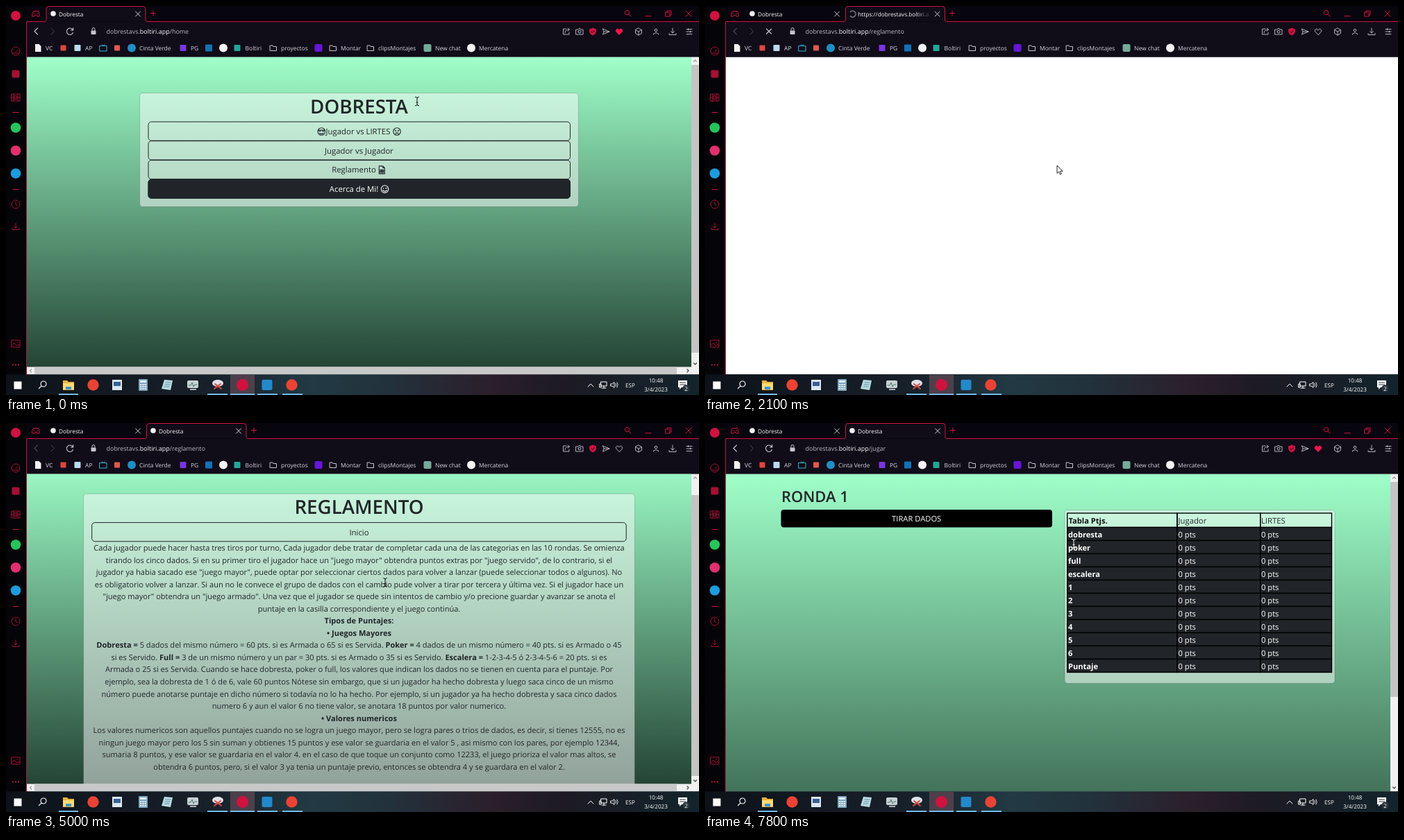
These frames come from a looping animation (998x561 px, 8000 ms). An HTML page:

```html
<!DOCTYPE html>
<html lang="es">
<head>
<meta charset="utf-8">
<style>
html, body { margin: 0; width: 100%; height: 100%; overflow: hidden; background: #07060c; }
svg { display: block; width: 998px; height: 561px; }
text { font-family: "Open Sans", "Noto Sans", sans-serif; text-rendering: geometricPrecision; white-space: pre; }
.ln { fill: none; stroke: currentColor; stroke-linecap: round; stroke-linejoin: round; }
</style>
</head>
<body>
<svg id="stage" viewBox="0 0 998 561" xmlns="http://www.w3.org/2000/svg"></svg>
<script>
const INK = '#212529', RED = '#d0123f', PALE = '#c8c5d0';

// Markup helpers
const text = (x, y, s, size, fill = '#fff', o = '') =>
  `<text x="${x}" y="${y}" font-size="${size}" fill="${fill}" ${o}>${s}</text>`;
const mid = 'text-anchor="middle"';
const rect = (x, y, w, h, fill, o = '') => `<rect x="${x}" y="${y}" width="${w}" height="${h}" fill="${fill}" ${o}/>`;
const dot = (x, y, r, fill) => `<circle cx="${x}" cy="${y}" r="${r}" fill="${fill}"/>`;
const box = (x, y, s, fill, r = 1) => rect(x - s / 2, y - s / 2, s, s, fill, `rx="${r}"`);
const line = (x, y, d, color, w = 1) =>
  `<path class="ln" transform="translate(${x} ${y})" d="${d}" style="color:${color};stroke-width:${w}"/>`;
const group = (id, s, o = '') => `<g id="${id}" ${o}>${s}</g>`;
const ring = r => `M${-r} 0a${r} ${r} 0 1 0 ${2 * r} 0a${r} ${r} 0 1 0 ${-2 * r} 0`;

const CROSS = 'M-3.5-3.5L3.5 3.5M3.5-3.5L-3.5 3.5';
const PLUS = 'M-3.5 0H3.5M0-3.5V3.5';
const LENS = ring(3.2) + 'M2.3 2.3L5.5 5.5';
const DOWN = 'M0-5V2M-2.5-.5L0 2L2.5-.5M-5 2.5V4.5H5V2.5';
const FOLDER = 'M-4.5-3.5H-1L0-2H4.5V4H-4.5Z';
const HEART = 'M0 4.5L-4.3 0C-6-2.5-2-6 0-2.2C2-6 6-2.5 4.3 0Z';

// Browser frame
function sidebar() {
  return rect(0, 0, 30, 532, '#050509') + dot(14, 14, 7, RED) +
    line(14, 65, ring(6) + 'M0 1L3-2M-4 3H4', '#a51034') + box(14, 98, 11, '#a51034', 2) +
    line(14, 132, 'M-6-5H6V5H-6ZM-3-5V5M3-5V5M-1.5-2.5H1.5V2.5H-1.5ZM-6 0H-3M3 0H6', '#a51034') +
    line(14, 153.5, 'M-4 0H4', RED) + dot(14, 175.5, 7.3, '#25c55a') + dot(14, 208.5, 7.3, '#e0306d') +
    dot(14, 241.5, 7.3, '#1d9bdc') + line(14, 264.5, 'M-4 0H4', RED) +
    line(14, 286, ring(6) + 'M0-3.5V0L2 2', '#a51034') + line(14, 318, DOWN, '#a51034') +
    line(14, 487, 'M-6-5H6V5H-6ZM-6 3L-2-1L2 3L4 1L6 3M2-2H3', '#a51034') +
    [10, 14, 18].map(x => dot(x, 517.5, 1.1, RED)).join('');
}

function bookmarks() {
  const label = (x, s) => text(x, 63.7, s, 8.5, '#d9d7df');
  const folder = (x, s) => line(x, 60.5, FOLDER, PALE) + label(x + 11, s);
  return `<path d="M42 55H47.5L50.5 58V66H42Z" fill="#f4f4f6"/>` + label(57, 'VC') +
    box(82.5, 60.5, 8, '#e2463c') + box(103, 60.5, 9, '#b9dcf2') + label(114, 'AP') +
    line(140, 61, 'M-5-3.5H5V4H-5ZM-2-5.5L0-3.5L2-5.5', '#35b6d6') + box(160, 60.5, 8, '#e2594f') +
    dot(181, 60.5, 6, '#1f8fc4') + label(192, 'Cinta Verde') + box(255, 60.5, 9, '#7a35e0') +
    label(266, 'PG') + box(292, 60.5, 10, '#1272b8') + dot(313, 60.5, 6, '#f3f3f5') +
    box(333, 60.5, 9, '#22a699') + label(344.5, 'Boltiri') + folder(385, 'proyectos') +
    box(450, 60.5, 11, '#6716d8', 2) + folder(471, 'Montar') + folder(525, 'clipsMontajes') +
    box(607, 60.5, 11, '#74aa9c', 2) + label(618, 'New chat') + dot(670, 60.5, 6, '#f3f3f5') +
    label(681, 'Mercatena');
}

function toolbar() {
  const bits = [
    [807, 'M0-4H-4.5V4H4V1M-2 2C-2-1 0-3 4-3M2-5L4.5-3L2-1'],
    [826, 'M-5-3H-2L-1-4.5H1L2-3H5V4H-5Z' + ring(2)],
    [864, 'M-4.5-4L5 0L-4.5 4L-3 0ZM-3 0H5'],
    [911, 'M0-5L4.5-2.5V2.5L0 5L-4.5 2.5V-2.5ZM-4.5-2.5L0 0L4.5-2.5M0 0V5'],
    [936, 'M-1.8-2a1.8 1.8 0 1 0 3.6 0a1.8 1.8 0 1 0-3.6 0M-3.5 4V3Q0 0 3.5 3V4'],
    [960, DOWN],
    [984, 'M-4-3.5H4M-4 0H4M-4 3.5H4M-1.5-4.5V-2.5M1.5-1V1']
  ];
  return bits.map(([x, d]) => line(x, 37, d, PALE, .9)).join('') +
    `<path transform="translate(845 37)" d="M0-5.5L5-3.5V0Q4 4 0 5.5Q-4 4-5 0V-3.5Z" fill="${RED}"/>` +
    line(845, 37, 'M-2 0L-.5 1.7L2.2-1.5', '#100c18') +
    group('heartOff', line(883, 37, HEART, PALE, .9)) +
    group('heartOn', `<path transform="translate(883 37)" d="${HEART}" fill="#f0164b" stroke="#f0164b"/>`) +
    group('back', line(43, 36.5, 'M2.5-4.5L-2 0L2.5 4.5', 'currentColor', 1.1)) +
    line(67, 36.5, 'M-2-4.5L2.5 0L-2 4.5', '#4b4753') +
    group('reload', line(92, 36.5, 'M4.5-1.5A4.7 4.7 0 1 0 4.5 2M4.7-5V-1.5H1.5', PALE, 1.1)) +
    group('stop', line(92, 36.5, CROSS, PALE, 1.1)) +
    rect(122.5, 35.5, 7, 5.5, PALE, 'rx="1"') + line(126, 35, 'M-2 .5V-1.5A2 2 0 0 1 2-1.5V.5', PALE) +
    `<text y="40" x="144.5" font-size="8.95" fill="#bbb7c4">dobrestavs.<tspan fill="#fff">boltiri.app</tspan><tspan id="path"></tspan></text>`;
}

function tabs() {
  const edge = (a, b) =>
    `<path d="M30 22.5H${a - 2}Q${a} 22.5 ${a} 20V4Q${a} .5 ${a + 4} .5H${b - 4}Q${b} .5 ${b} 4V20Q${b} 22.5 ${b + 2} 22.5H998" fill="#100c18" stroke="${RED}"/>`;
  const title = x => dot(x + 4, 11, 3.8, '#f2f2f4') + text(x + 12, 14.6, 'Dobresta', 8.25);
  const close = x => line(x, 11.5, CROSS, '#e8e6ec', .9);
  const plus = x => line(x, 10.5, PLUS, RED);
  return group('oneTab', edge(58, 201) + plus(212)) +
    group('newTab', edge(202.5, 345.5) +
      `<path id="spin" d="M4.4 0A4.4 4.4 0 1 1 0-4.4" class="ln" stroke-width="1.6" style="color:#77737f"/>` +
      text(220.5, 14.6, 'https://dobrestavs.boltiri.a', 8.25) + rect(304, 6, 22, 11, 'url(#fade)') +
      close(334.5) + plus(356)) +
    group('readyTab', edge(202.5, 346) + title(208) + close(335) + plus(357)) + title(64) + close(190);
}

function frame() {
  return rect(0, 0, 998, 74, '#07050d') + rect(30, 23, 968, 51, '#100c18') + sidebar() +
    line(43, 11.5, 'M-5-1L-3.5-4H3.5L5-1V3.5H2L1 1.5H-1L-2 3.5H-5ZM-3-.5H-2M2-.5H3', RED) +
    tabs() + rect(29, 22.5, 1.2, 509.5, '#b01038') +
    line(894.5, 9.5, LENS, RED) + line(925, 14.5, 'M-4 0H4', RED) +
    line(954, 11, 'M-4-2H2V4H-4ZM-2-2V-4H4V2H2', RED) + line(983, 11, 'M-4-4L4 4M4-4L-4 4', RED) +
    toolbar() + bookmarks();
}

function taskbar() {
  const under = [[76, 28], [290, 29], [362, 29], [398, 29]];
  return rect(0, 531.5, 998, 30, 'url(#bar)') + rect(323, 532, 35, 29, '#5a4652', 'opacity=".8"') +
    under.map(([x, w]) => rect(x, 559, w, 2, '#6fb7ec')).join('') + rect(323, 559, 35, 2, '#6fb7ec') +
    box(17, 547, 11, '#fff', 0) + line(54, 545, 'M-4 0a4 4 0 1 0 8 0a4 4 0 1 0-8 0M-2.8 2.8L-6.5 6.5', '#f2f2f2', 1.2) +
    `<path d="M82 540H88L90 542H98V554H82Z" fill="#e7b33d"/>` + rect(82, 544, 16, 9, '#ffda72') + rect(86, 549, 8, 4, '#3d94d8') +
    dot(125.5, 546.5, 8.2, '#ea4335') + rect(153, 539, 14, 15, '#dbe7f2') + rect(155, 542, 10, 6, '#395f94') +
    rect(191, 538, 13, 17, '#7ba6bf', 'rx="1"') + rect(193, 540, 9, 3, '#e6f4fa') +
    [0, 1, 2].map(r => [0, 1, 2].map(c => rect(193 + c * 3.3, 545 + r * 3, 2.3, 2, '#e9eef2')).join('')).join('') +
    `<path d="M228 539L240 540L237 554L224 552Z" fill="#b9dbe2"/>` + line(232, 546, 'M-2-3H5M-3 0H4M-4 3H3', '#5f929e') +
    rect(261, 540, 16, 11, '#c9d2d6', 'rx="2"') + line(269, 546, 'M-6 1H-3L-1-3L1 3L3 0H6', '#427567') + rect(265, 552, 9, 2, '#aab4b8') +
    `<ellipse cx="305" cy="544" rx="8" ry="5" fill="#dfe1e8"/>` + line(305, 548, 'M-5 4L4-3M5 4L-4-3', '#d3483f', 2) +
    dot(340.5, 546.5, 8.5, RED) + box(376, 546.5, 15, '#2489ca', 2) + dot(411.5, 546.5, 8.2, '#ea4335') +
    line(842, 547, 'M-4 2L0-2L4 2', '#fff') + line(860, 546, 'M-3-4H5V2H-3ZM1 2V5M-2 5H4M-5-1H-3V4H-5Z', '#fff') +
    line(876, 546.5, 'M-5-1.5H-3L0-4V4L-3 1.5H-5ZM2-2Q3.5 0 2 2M4-3.5Q6.5 0 4 3.5', '#fff', .9) +
    text(892, 549.6, 'ESP', 8.1) + text(936, 542.6, '10:48', 8.1, '#fff', mid) + text(936, 555.6, '3/4/2023', 8.1, '#fff', mid) +
    `<path d="M968 540H981V550H973L970 553V550H968Z" fill="#fff"/>` + line(974.5, 545, 'M-4-2H4M-4 1H4', '#333') +
    dot(979.5, 551.5, 5.2, '#29343c') + text(979.5, 554.6, '2', 8, '#fff', mid);
}

// Pages
const FACE = ring(5.3);
const glyphs = {
  cool: FACE + 'M-4.8-2H4.8M-4-1.8Q-2.5 1.5-.7-1.8M4-1.8Q2.5 1.5 .7-1.8M-2.5 2.5Q0 4.2 2.5 2.5',
  angry: FACE + 'M-3-2L-1.2-1M3-2L1.2-1M-1.8 0V.2M1.8 0V.2M-2 3Q0 1.2 2 3',
  sheet: 'M-4-5.5H1.5L4-3V5.5H-4ZM1.5-5.5V-3H4M-2.5 0H2.5V3.5H-2.5ZM-2.5 1.7H2.5M0 0V3.5',
  wink: FACE + 'M-2-1.5V-1M1-1.2Q2-2 3-1.2M-2.8 1.5Q0 4.8 2.8 1.5'
};

const card = (x, y, w, h) => rect(x, y, w, h, '#fff', 'fill-opacity=".5" stroke="#000" stroke-opacity=".175" rx="4.4"');

function button(id, x, y, w, label, cx, icons = []) {
  const face = c => text(cx, y + 18, label, 11.35, c, mid) +
    `<g class="icons">${icons.map(([k, ix]) => line(ix, y + 14, glyphs[k], c, 1.1)).join('')}</g>`;
  return `<rect x="${x}" y="${y}" width="${w}" height="27.2" rx="4.4" fill="none" stroke="${INK}"/>` + face(INK) +
    group(id, `<rect x="${x}" y="${y}" width="${w}" height="27.2" rx="4.4" fill="${INK}" stroke="${INK}"/>` + face('#fff'));
}

const heading = s => text(508.5, 154.5, s, 27.7, INK, mid + ' font-weight="600"');

function homePage() {
  return rect(30, 73.5, 957, 470, 'url(#mint)') + card(192.5, 125.5, 632, 164) + heading('DOBRESTA') +
    button('b1', 205, 167, 607.5, 'Jugador vs LIRTES', 507, [['cool', 454.3], ['angry', 563]]) +
    button('b2', 205, 194.7, 607.5, 'Jugador vs Jugador', 508.5) +
    button('b3', 205, 222.4, 607.5, 'Reglamento', 501, [['sheet', 541.3]]) +
    button('b4', 205, 250.1, 607.5, 'Acerca de Mi!', 501, [['wink', 545.5]]);
}

const RULES = `Cada jugador puede hacer hasta tres tiros por turno, Cada jugador debe tratar de completar cada una de las categorias en las 10 rondas. Se omienza
tirando los cinco dados. Si en su primer tiro el jugador hace un "juego mayor" obtendra puntos extras por "juego servido", de lo contrario, si el
jugador ya habia sacado ese "juego mayor", puede optar por seleccionar ciertos dados para volver a lanzar (puede seleccionar todos o algunos). No
es obligatorio volver a lanzar. Si aun no le convece el grupo de dados con el cambio pude volver a tirar por tercera y última vez. Si el jugador hace un
"juego mayor" obtendra un "juego armado". Una vez que el jugador se quede sin intentos de cambio y/o precione guardar y avanzar se anota el
puntaje en la casilla correspondiente y el juego continúa.
*Tipos de Puntajes:*
*• Juegos Mayores*
*Dobresta =* 5 dados del mismo número = 60 pts. si es Armada o 65 si es Servida. *Poker =* 4 dados de un mismo número = 40 pts. si es Armado o 45
si es Servido. *Full =* 3 de un mismo número y un par = 30 pts. si es Armado o 35 si es Servido. *Escalera =* 1-2-3-4-5 ó 2-3-4-5-6 = 20 pts. si es
Armada o 25 si es Servida. Cuando se hace dobresta, poker o full, los valores que indican los dados no se tienen en cuenta para el puntaje. Por
ejemplo, sea la dobresta de 1 ó de 6, vale 60 puntos Nótese sin embargo, que si un jugador ha hecho dobresta y luego saca cinco de un mismo
número puede anotarse puntaje en dicho número si todavía no lo ha hecho. Por ejemplo, si un jugador ya ha hecho dobresta y saca cinco dados
numero 6 y aun el valor 6 no tiene valor, se anotara 18 puntos por valor numerico.
*• Valores numericos*
Los valores numericos son aquellos puntajes cuando no se logra un juego mayor, pero se logra pares o trios de dados, es decir, si tienes 12555, no es
ningun juego mayor pero los 5 sin suman y obtienes 15 puntos y ese valor se guardaria en el valor 5 , asi mismo con los pares, por ejemplo 12344,
sumaria 8 puntos, y ese valor se guardaria en el valor 4. en el caso de que toque un conjunto como 12233, el juego prioriza el valor mas altos, se
obtendra 6 puntos, pero, si el valor 3 ya tenia un puntaje previo, entonces se obtendra 4 y se guardara en el valor 2.`;

function rulesPage() {
  const bold = s => s.replace(/\*(.+?)\*/g, '<tspan font-weight="700">$1</tspan>');
  return rect(30, 73.5, 957, 495, 'url(#mint)') + card(111.5, 125.5, 794, 425) + heading('REGLAMENTO') +
    button('inicio', 123.7, 167, 769.5, 'Inicio', 508.5) +
    RULES.split('\n').map((s, i) => text(508.5, 207.4 + i * 17.55, bold(s), 11.05, INK, mid)).join('');
}

function gamePage() {
  const rows = ['dobresta', 'poker', 'full', 'escalera', 1, 2, 3, 4, 5, 6, 'Puntaje'];
  const cells = (y, h, fill) => [[521.7, 158.3], [680, 119.7], [799.7, 102.8]]
    .map(([x, w]) => rect(x, y, w, h, fill, 'stroke="#000" stroke-width="1.4"')).join('');
  const B = 'font-weight="700"';
  return rect(30, 73.5, 957, 643, 'url(#mint)') + text(110, 113.7, 'RONDA 1', 21.9, INK, 'font-weight="600"') +
    rect(109.5, 125, 390.5, 25.5, '#000', 'rx="4"') + text(304.7, 142, 'TIRAR DADOS', 11.2, '#fff', mid) +
    card(518, 125.5, 389, 250) + cells(130, 20.5, 'none') +
    text(523.5, 145, 'Tabla Ptjs.', 11.1, '#111', B) + text(681.5, 145, 'Jugador', 11.3, INK) + text(801, 145, 'LIRTES', 11.3, INK) +
    rows.map((r, i) => {
      const y = 150.5 + i * 19;
      return cells(y, 19, INK) + text(523, y + 14, r, 11.1, '#fff', B) +
        text(681.5, y + 14, '0 pts', 11.2) + text(801, y + 14, '0 pts', 11.2);
    }).join('');
}

function scrollbars() {
  const tri = (x, y, d, c) => line(x, y, d, c, 1.2);
  return group('bars', rect(987, 73.5, 11, 458, '#f1f1f1') + group('thumb', rect(987, 85, 11, 1, '#c4c4c4', 'id="grip"')) +
    tri(992.5, 79, 'M-2 1L0-1L2 1', '#999') + group('downArrow', tri(992.5, 516, 'M-2-1L0 1L2-1', '#444')) +
    group('hbar', rect(30, 520.5, 957, 11, '#f1f1f1') + rect(41, 520.5, 925, 11, '#c8c8c8') +
      tri(35.5, 526, 'M1-2L-1 0L1 2', '#999') + tri(982, 526, 'M-1-2L1 0L-1 2', '#444')));
}

const pointers = {
  beam: '<path class="ln" d="M-2.5-6.3Q0-6.3 0-4.8V4.8Q0 6.3-2.5 6.3M2.5-6.3Q0-6.3 0-4.8M0 4.8Q0 6.3 2.5 6.3M-1 1.5H1"/>',
  arrow: '<path d="M0 0V11.3L2.6 8.9L4.4 13L6.3 12.1L4.5 8.2H8Z" fill="#fff" stroke="#111" stroke-width=".9"/>',
  hand: '<path d="M-1.2 1Q0-1 1.2 1V6L2.6 5.4L4 6.4L5.4 6.2L7 7.6V11.5L5.6 15.7H-.6L-4 10.2Q-4.3 8.4-2.6 9L-1.2 10.5Z" fill="#fff" stroke="#111" stroke-width=".9"/>'
};

document.getElementById('stage').innerHTML = `<defs>
  <linearGradient id="mint" x2="0" y2="1"><stop stop-color="#9fffc9"/><stop offset="1" stop-color="#1e3b2e"/></linearGradient>
  <linearGradient id="fade"><stop stop-color="#100c18" stop-opacity="0"/><stop offset="1" stop-color="#100c18"/></linearGradient>
  <linearGradient id="bar"><stop stop-color="#0d1219"/><stop offset=".3" stop-color="#18202a"/><stop offset=".44" stop-color="#223a44"/>
    <stop offset=".55" stop-color="#22323c"/><stop offset=".7" stop-color="#2b1f2b"/><stop offset=".8" stop-color="#1d1a23"/><stop offset="1" stop-color="#12242c"/></linearGradient>
  <clipPath id="view"><path d="M30 73.5H998V531.5H30Z"/></clipPath></defs>` +
  frame() + `<g clip-path="url(#view)">` + rect(30, 73.5, 968, 458, '#fff') + group('home', homePage()) +
  group('rules', rulesPage()) + group('game', gamePage()) + scrollbars() +
  group('hint', rect(30.5, 512, 185.5, 20, '#fbfbfb', 'stroke="#aaa"') +
    text(36, 526, 'https://dobrestavs.boltiri.app/reglamento', 8.95, '#555')) + '</g>' + taskbar() +
  group('pointer', Object.entries(pointers).map(([k, s]) => group(k, s)).join(''));

// Motion
const MOVES = [
  [0, 592, 137.5, 'beam'], [200, 589, 150, 'beam'], [300, 583, 170, 'hand'], [500, 566, 192, 'hand'],
  [700, 538, 212, 'hand'], [900, 513, 228, 'hand'], [1100, 507, 238, 'hand'], [1400, 507, 238, 'arrow'],
  [1700, 507, 238, 'arrow'], [2100, 507, 230, 'arrow'], [2300, 507, 230, 'arrow'], [2400, 507, 222, 'arrow'],
  [2600, 509, 222, 'beam'], [3300, 509, 222, 'beam'], [4300, 536, 228, 'beam'], [5000, 546, 230, 'beam'],
  [5300, 522, 190, 'beam'], [5400, 512, 168, 'hand'], [5600, 507, 166, 'hand'], [5800, 506, 170, 'hand'],
  [6100, 530, 186, 'hand'], [6400, 562, 203, 'hand'], [6600, 573, 199, 'hand'], [6700, 575, 183, 'hand'],
  [7000, 576, 181, 'hand'], [7100, 574, 181, 'arrow'], [7400, 548, 176, 'beam'], [7700, 531, 174, 'beam'], [8000, 531, 174, 'beam']
];
const HOVER = {
  b1: [[300, 500], [5850, 6250], [6720, 7200]],
  b2: [[500, 800], [6250, 6700]],
  b3: [[850, 1400]],
  inicio: [[5350, 5700]]
};

const $ = id => document.getElementById(id);
const clamp = v => Math.max(0, Math.min(1, v));
const ease = v => { v = clamp(v); return v * v * (3 - 2 * v); };
const show = (id, on) => { $(id).style.display = on ? '' : 'none'; };
const icons = document.querySelectorAll('.icons');

function draw(t) {
  const page = t < 1400 ? 'home' : t < 2600 ? 'blank' : t < 5700 ? 'rules' : t < 7100 ? 'home' : 'game';
  const atHome = t < 1400 || (t >= 5900 && t < 7100);
  const loading = page === 'blank', game = page === 'game';
  for (const p of ['home', 'rules', 'game']) show(p, p === page);
  show('oneTab', t < 1400);
  show('newTab', loading);
  show('readyTab', t >= 2600);
  $('spin').setAttribute('transform', `translate(212.5 11.5) rotate(${Math.min(t, 2100) * .45 - 720})`);
  show('stop', loading);
  show('reload', !loading);
  $('path').textContent = game ? '/jugar' : atHome ? '/home' : '/reglamento';
  $('back').style.color = atHome || game ? PALE : '#4b4753';
  show('heartOn', atHome || game);
  show('heartOff', !(atHome || game));
  icons.forEach(i => { i.style.display = t >= 5700 && t < 5900 ? 'none' : ''; });

  const scroll = page === 'rules' ? ease((t - 3500) / 700) : 0;
  $('rules').setAttribute('transform', `translate(0 ${-23.4 * scroll})`);
  show('bars', !loading);
  show('hbar', !game);
  $('thumb').setAttribute('transform', `translate(0 ${19 * scroll})`);
  $('grip').setAttribute('height', game ? 310 : page === 'rules' ? 405 : 415);
  $('downArrow').setAttribute('transform', `translate(0 ${game ? 10 : 0})`);

  for (const id in HOVER) {
    $(id).style.opacity = Math.max(...HOVER[id].map(([a, b]) => clamp((t - a) / 150) * (1 - clamp((t - b) / 150))));
  }
  $('hint').style.opacity = clamp((t - 900) / 150) * (t < 1400 ? 1 : clamp((1630 - t) / 230));

  const i = MOVES.findLastIndex(m => m[0] <= t), a = MOVES[i], b = MOVES[i + 1] || a;
  const k = (t - a[0]) / (b[0] - a[0] || 1);
  for (const p in pointers) show(p, p === a[3]);
  $('pointer').setAttribute('transform', `translate(${a[1] + (b[1] - a[1]) * k} ${a[2] + (b[2] - a[2]) * k})`);
  $('beam').style.color = game && t > 7400 ? '#f4f4f4' : '#111';
}

const start = performance.now();
function tick() {
  draw(Math.floor((performance.now() - start) % 8000 / 100) * 100);
  requestAnimationFrame(tick);
}
tick();
</script>
</body>
</html>
```
